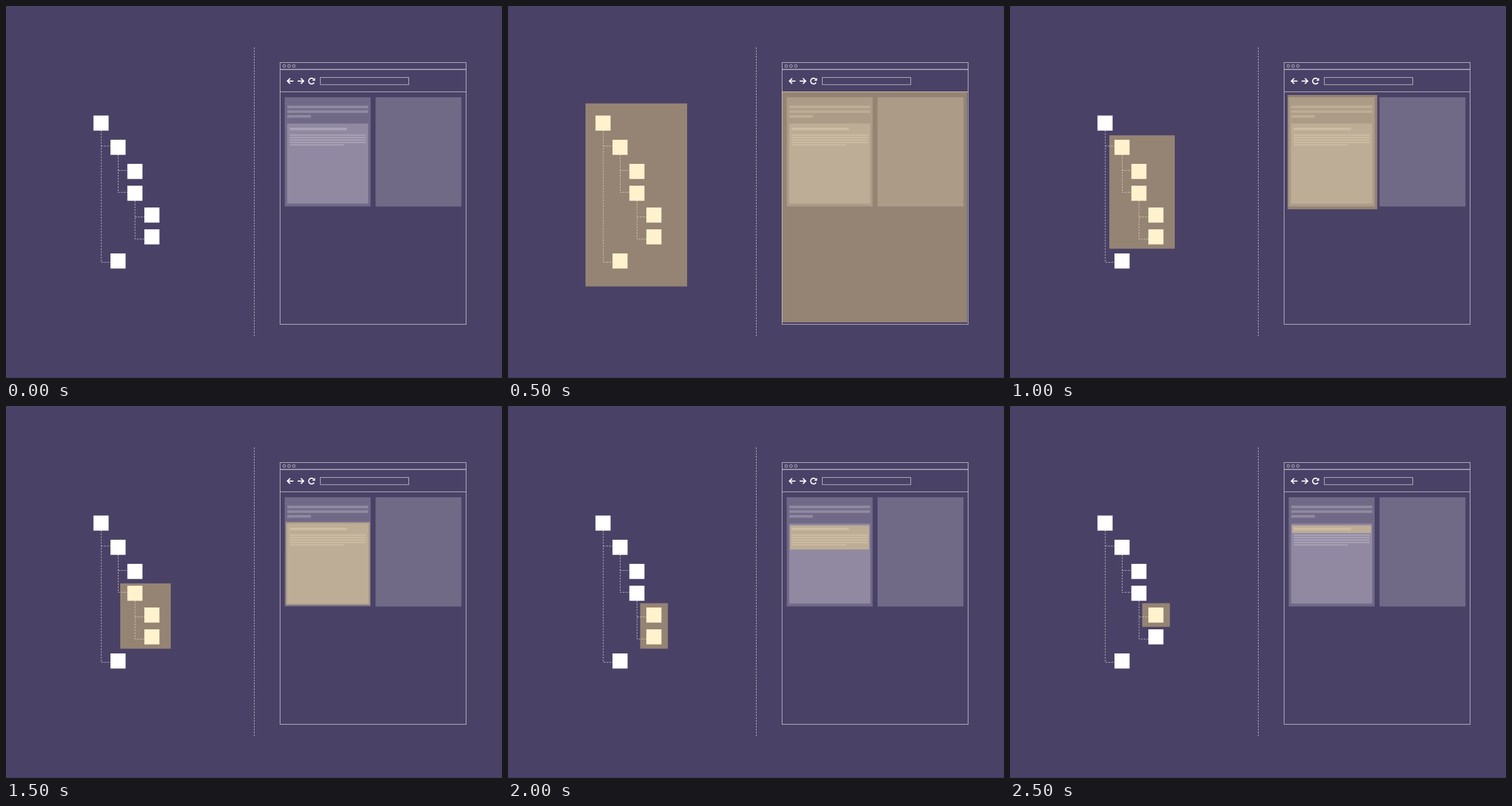
An HTML page for the animation above (3 s loop, 864 px wide and 648 px high).

```html
<!DOCTYPE html>
<html lang="en">
<head>
<meta charset="utf-8">
<title>Element tree and page</title>
<style>
  html, body { margin: 0; width: 100%; height: 100%; overflow: hidden; background: #4a4266; }
  svg { display: block; width: 864px; height: 648px; }
  .dash { fill: none; stroke: #fff; stroke-opacity: .65; stroke-width: 1; stroke-dasharray: 3 2; }
  .frame { fill: none; stroke: #c3bfcd; stroke-width: 1; }
  .icon { fill: none; stroke: #fff; stroke-width: 2; }
  .tint { fill: #ffdf88; fill-opacity: .415; }
</style>
</head>
<body>
<svg viewBox="0 0 864 648">
  <rect width="864" height="648" fill="#4a4266"/>
  <rect y="647" width="864" height="1" fill="#403958"/>
  <path class="dash" d="M432.5 72V576"/>

  <g class="dash">
    <path d="M166 217V446.5H182M166 244H182"/>
    <path d="M195.5 259V324.5H211M195.5 286.5H211"/>
    <path d="M224.8 339V406H241M224.8 367.5H241"/>
  </g>
  <g id="nodes" fill="#fff"></g>

  <g class="frame">
    <rect x="477.5" y="98.5" width="324" height="456"/>
    <path d="M477 110.5H802" stroke-width="1.6"/>
    <path d="M477 149.5H802"/>
    <circle cx="484.6" cy="104.5" r="2.4"/>
    <circle cx="493" cy="104.5" r="2.4"/>
    <circle cx="501.4" cy="104.5" r="2.4"/>
    <rect x="547.5" y="124.5" width="154" height="12.5"/>
  </g>
  <g class="icon">
    <path d="M500.7 130.7H490.3M495 125.9L490.2 130.7L495 135.5"/>
    <path d="M508 130.7H518.4M513.7 125.9L518.5 130.7L513.7 135.5"/>
    <path d="M536.6 133.2A5 5 0 1 1 535.8 127.3"/>
    <path d="M538.4 125V130.2H533.2Z" fill="#fff" stroke="none"/>
  </g>
  <g id="page"></g>
  <rect id="treeTint" class="tint"/>
  <rect id="pageTint" class="tint"/>
</svg>
<script>
const NS = "http://www.w3.org/2000/svg";
const byId = id => document.getElementById(id);

function place(el, [x, y, right, bottom]) {
  const attrs = { x, y, width: right - x, height: bottom - y };
  for (const key in attrs) el.setAttribute(key, attrs[key]);
}

function addRect(parent, box, fill) {
  const el = document.createElementNS(NS, "rect");
  place(el, box);
  if (fill) el.setAttribute("fill", fill);
  parent.append(el);
}

const nodes = [
  [152.4, 190.8], [182, 233], [211.4, 275], [211.4, 313],
  [241, 351], [241, 389], [182, 431]
];
for (const [x, y] of nodes) addRect(byId("nodes"), [x, y, x + 26.3, y + 26.3]);

const page = byId("page");
addRect(page, [485.5, 159, 635.2, 349.2], "#716a87");
addRect(page, [643.7, 159, 793.4, 349.2], "#716a87");
for (const [y, right] of [[173.5, 631], [181.5, 631], [189.8, 531]])
  addRect(page, [490, y, right, y + 4.8], "#8f89a1");
addRect(page, [489.7, 204.8, 631, 344.2], "#9089a1");
addRect(page, [494.3, 212, 594, 216.5], "#a8a2b5");
for (let i = 0; i < 5; i++) {
  const y = 223.7 + i * 4.25;
  addRect(page, [494.3, y, i < 4 ? 626.8 : 588.5, y + 2.4], "#a8a2b5");
}

// Each step: highlighted box in the tree, then its box on the page
const steps = [
  null,
  [[135, 169.7, 312, 488.5], [477.5, 149, 800, 551]],
  [[173, 225.3, 287, 422.7], [483.5, 155, 639.7, 354]],
  [[199, 309, 287, 422.7], [487.3, 202.3, 634, 346.7]],
  [[230.3, 343.5, 278.5, 422.7], [491.3, 208, 629, 250]],
  [[230.3, 343.5, 278.5, 384.7], [491.3, 208, 629, 221.2]]
];
const tints = [byId("treeTint"), byId("pageTint")];
const STEP = 500;

function draw(time) {
  const step = steps[Math.floor(time / STEP) % steps.length];
  tints.forEach((el, i) => place(el, step ? step[i] : [0, 0, 0, 0]));
}

const start = performance.now();
function tick() {
  draw(performance.now() - start);
  requestAnimationFrame(tick);
}
tick();
</script>
</body>
</html>
```
